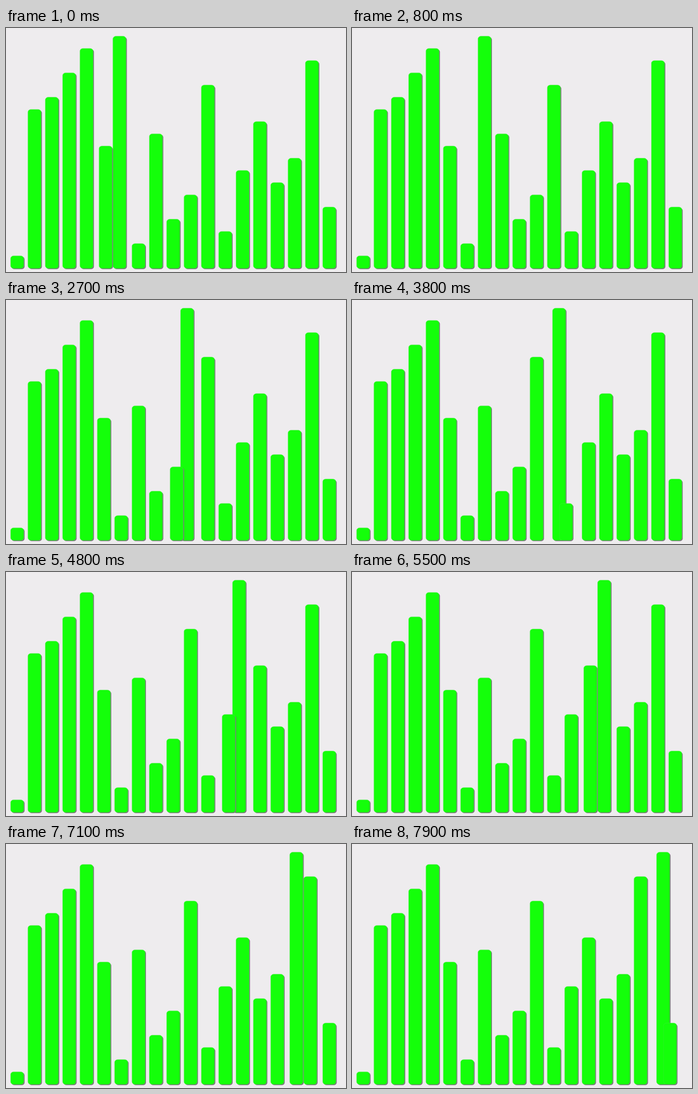
These frames come from a looping animation (600 by 432 pixels, 8000 ms). An HTML page:

```html
<!DOCTYPE html>
<html lang="en">
<head>
<meta charset="utf-8">
<title>Bubble sort</title>
<style>
  html, body { margin: 0; width: 100%; height: 100%; overflow: hidden; background: #eeecee; }
  svg { display: block; width: 600px; height: 432px; }
  .shadow { fill: #7a757a; }
  .face { fill: #14ff0a; stroke: #3fe83a; stroke-width: .5; }
</style>
</head>
<body>
<svg id="stage" viewBox="0 0 600 432"></svg>
<script>
const LOOP = 8000, FRAME = 100;
const STEP = 62.5, STEPS_PER_SWAP = 11, FIRST_STEP = 9;
const LEFT = 8.2, PITCH = 30.6, WIDTH = 23, BASE = 425.5, UNIT = 21.6;
const START = [1, 13, 14, 16, 18, 19, 10, 2, 11, 4, 6, 15, 3, 8, 12, 7, 9, 17, 5];
const LARGEST = START.indexOf(19);
const stage = document.getElementById("stage");

function addRect(parent, className, offset, height) {
  const rect = document.createElementNS(stage.namespaceURI, "rect");
  const attrs = { class: className, x: offset, y: BASE - height + offset,
                  width: WIDTH, height, rx: 5.5, ry: 4.5 };
  for (const name in attrs) rect.setAttribute(name, attrs[name]);
  parent.append(rect);
}

function makeBar(value) {
  const group = document.createElementNS(stage.namespaceURI, "g");
  const height = value * UNIT + 0.5;
  addRect(group, "shadow", 1.6, height);
  addRect(group, "face", 0, height);
  stage.append(group);
  return group;
}

const bars = START.map(makeBar);

function place(bar, slot) {
  bar.setAttribute("transform", `translate(${(LEFT + slot * PITCH).toFixed(2)} 0)`);
}

// The largest bar trades places with each right-hand neighbour in turn.
function draw(time) {
  const frameTime = Math.floor((time % LOOP) / FRAME) * FRAME;
  const step = FIRST_STEP + Math.floor(frameTime / STEP + 0.1);
  const swap = Math.floor(step / STEPS_PER_SWAP);
  const progress = (step % STEPS_PER_SWAP) / (STEPS_PER_SWAP - 1);

  bars.forEach((bar, i) => {
    const passed = i - LARGEST - 1;
    let slot = i;
    if (i === LARGEST) slot += swap + progress;
    else if (i > LARGEST && passed < swap) slot -= 1;
    else if (passed === swap) slot -= progress;
    place(bar, slot);
  });
}

const began = performance.now();
function tick() {
  draw(performance.now() - began);
  requestAnimationFrame(tick);
}
tick();
</script>
</body>
</html>
```
